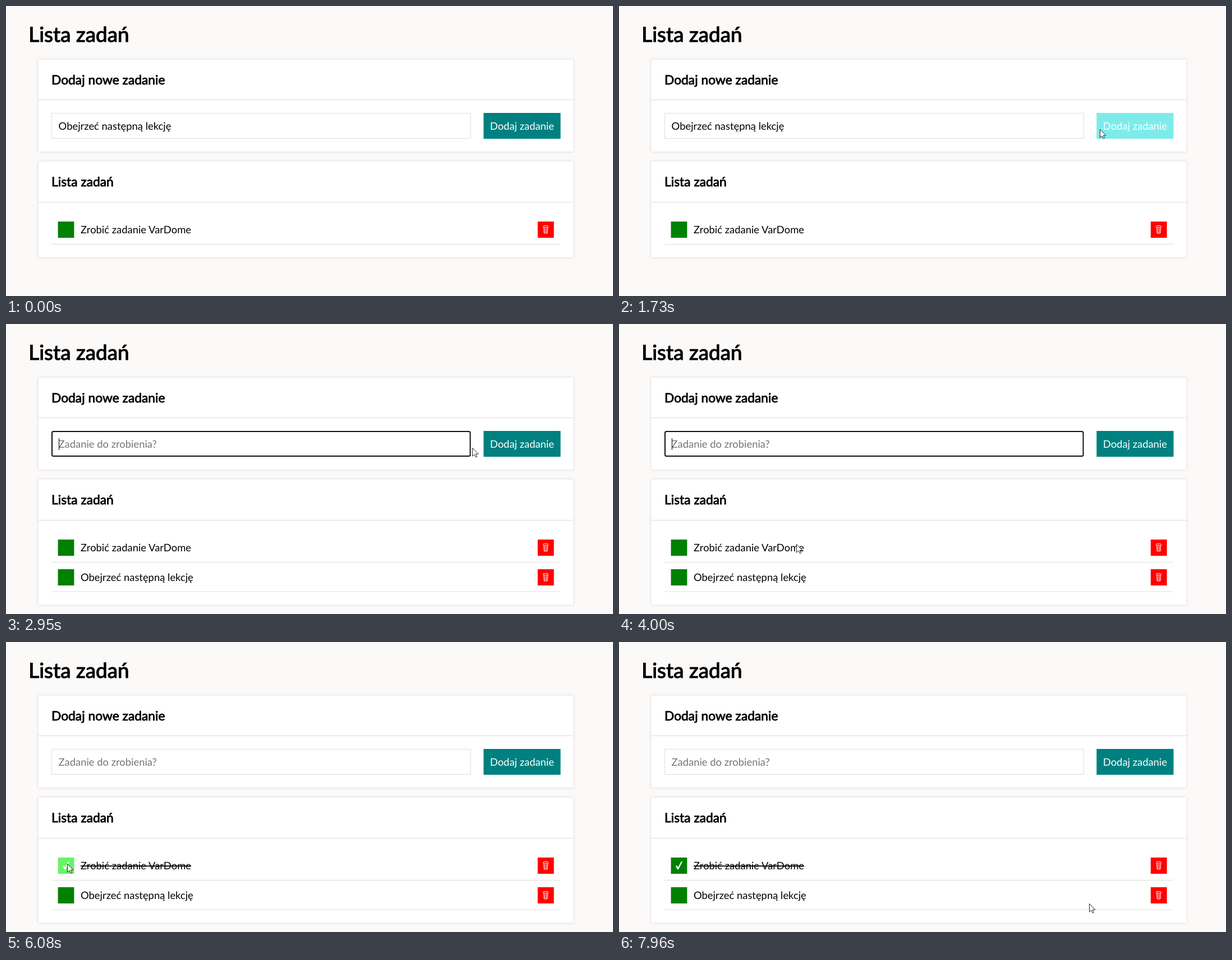
These frames come from a looping animation (1082 by 518 pixels, 8 s). An HTML page:

```html
<!DOCTYPE html>
<html lang="pl">
<head>
<meta charset="utf-8">
<title>Lista zadań</title>
<style>
  html, body { margin: 0; width: 100%; height: 100%; overflow: hidden; background: #fcfaf9; }
  svg { display: block; width: 1082px; height: 518px; }
  text { font: 18.4px Lato, sans-serif; text-rendering: geometricPrecision; }
  .title { font-size: 36.9px; stroke: #000; stroke-width: 1.15; }
  .heading { font-size: 22.8px; stroke: #000; stroke-width: .8; }
  .card { fill: #fff; filter: drop-shadow(0 0 2px #d4d2d2); }
  .rule { stroke: #ddd; }
  .icon { fill: none; stroke: #fff; }
  .done { text-decoration: line-through; }
</style>
</head>
<body>
<svg viewBox="0 0 1082 518">
  <defs>
    <g id="bin">
      <rect width="28.8" height="29" fill="red"/>
      <g class="icon">
        <rect x="9.9" y="7.7" width="8.8" height="3" rx="1.2"/>
        <path d="M10.8 10.7 11.3 20.6Q14.3 22 17.3 20.6L17.8 10.7"/>
        <path d="M13 12V20M15.6 12V20" stroke-width=".9"/>
      </g>
    </g>
  </defs>
  <text class="title" x="40.3" y="64">Lista zadań</text>

  <rect class="card" x="57.5" y="95.5" width="954" height="164.5"/>
  <path class="rule" d="M57.5 167.5H1011.5"/>
  <text class="heading" x="81" y="140.3">Dodaj nowe zadanie</text>
  <rect id="field" fill="#fff"/>
  <text id="entry" x="93.6" y="221.2"></text>
  <path id="caret" d="M94.5 204V225" stroke="#000"/>
  <rect id="button" x="851.3" y="191" width="137.2" height="46.2"/>
  <text x="919.9" y="221.2" fill="#fff" text-anchor="middle">Dodaj zadanie</text>

  <rect id="list" class="card" x="57.5" y="277.5" width="954"/>
  <path class="rule" d="M57.5 350.5H1011.5"/>
  <text class="heading" x="81" y="322.3">Lista zadań</text>
  <g>
    <rect id="box" x="92.6" y="385" width="28.8" height="29"/>
    <path id="check" d="M101 400.6 103.4 399.3 105.3 402.2 110.6 392.6 113.4 391.8 106 406.2H104.2Z" fill="#fff"/>
    <text id="task" x="133" y="406.2">Zrobić zadanie VarDome</text>
    <use href="#bin" x="947.8" y="385"/>
    <path class="rule" d="M81 425.5H988"/>
  </g>
  <g id="added">
    <rect x="92.6" y="438" width="28.8" height="29" fill="green"/>
    <text x="133" y="459.2">Obejrzeć następną lekcję</text>
    <use href="#bin" x="947.8" y="438"/>
    <path class="rule" d="M81 478H988"/>
  </g>

  <g id="pointer">
    <path id="arrow" d="M.5 .5V15.2L3.9 12 6.4 17 8.6 16 6.2 11.2H10.8Z" fill="#fff" stroke="#111" stroke-width=".9"/>
    <path id="beam" d="M-3.5 -8.5H-1.2L0 -7.5 1.2 -8.5H3.5M-3.5 8.5H-1.2L0 7.5 1.2 8.5H3.5M0 -7.5V7.5" fill="none" stroke="#111"/>
  </g>
</svg>
<script>
const LOOP = 8000, ADD = 2400, BLUR = 5410, CHECK = 5500;
const CARET_START = 2920, CARET_HALF = 530;

const easeIn = power => u => u ** power;
const easeOut = power => u => 1 - (1 - u) ** power;
const smooth = u => u * u * (3 - 2 * u);

// A bend other than 1 curves the path by easing y against x
const move = (start, end, x, y, ease = smooth, bend = 1) => ({ start, end, x, y, ease, bend });
const ENTRY = { x: 973, y: 520 };
const moves = [
  move(10, 250, 753, 341, easeOut(2)),
  move(510, 700, 617, 223),
  move(970, 1310, 817, 221),
  move(1570, 2100, 881, 219, easeOut(2.7)),
  move(2760, 3440, 452, 355, easeIn(1.7), 2),
  move(3630, 4420, 226, 407, easeOut(1.45), 0.6),
  move(4440, 5040, 109, 396, easeOut(2)),
  move(6080, 6880, 127, 418, easeOut(1.45), 3),
  move(6900, 7430, 555, 468),
  move(7620, 7960, 838, 467)
];

const $ = id => document.getElementById(id);
const set = (id, attrs) => {
  for (const key in attrs) $(id).setAttribute(key, attrs[key]);
};
const show = (id, on) => set(id, { visibility: on ? "visible" : "hidden" });

function pointerAt(t) {
  let { x, y } = ENTRY;
  for (const m of moves) {
    if (t < m.start) break;
    const p = m.ease(Math.min(1, (t - m.start) / (m.end - m.start)));
    x += (m.x - x) * p;
    y += (m.y - y) * p ** m.bend;
  }
  return { x, y };
}

function draw(t) {
  const { x, y } = pointerAt(t);
  const over = (left, top, right, bottom) => x >= left && x < right && y >= top && y < bottom;
  const added = t >= ADD, focused = added && t < BLUR, checked = t >= CHECK;
  const overField = over(81, 191, 829, 237);

  set("field", focused
    ? { x: 82, y: 192, width: 745.5, height: 44, rx: 2.5, stroke: "#111", "stroke-width": 2 }
    : { x: 81.5, y: 191.5, width: 746.7, height: 45, rx: 0, stroke: "#ddd", "stroke-width": 1 });
  $("entry").textContent = added ? "Zadanie do zrobienia?" : "Obejrzeć następną lekcję";
  set("entry", { fill: added ? "#757575" : "#000" });
  const phase = Math.floor((t - CARET_START) / CARET_HALF);
  show("caret", focused && t >= CARET_START && phase % 2 === 0);

  set("button", { fill: over(851, 191, 989, 237) ? "#7eebeb" : "teal" });
  set("list", { height: added ? 224 : 171.5 });
  show("added", added);
  set("box", { fill: over(92, 385, 121.5, 414) ? "#66f566" : "green" });
  show("check", checked);
  $("task").classList.toggle("done", checked);

  set("pointer", { transform: `translate(${Math.round(x)} ${Math.round(y)})` });
  show("arrow", !overField);
  show("beam", overField);
}

const start = performance.now();
function tick() {
  draw((performance.now() - start) % LOOP);
  requestAnimationFrame(tick);
}
draw(0);
requestAnimationFrame(tick);
</script>
</body>
</html>
```
